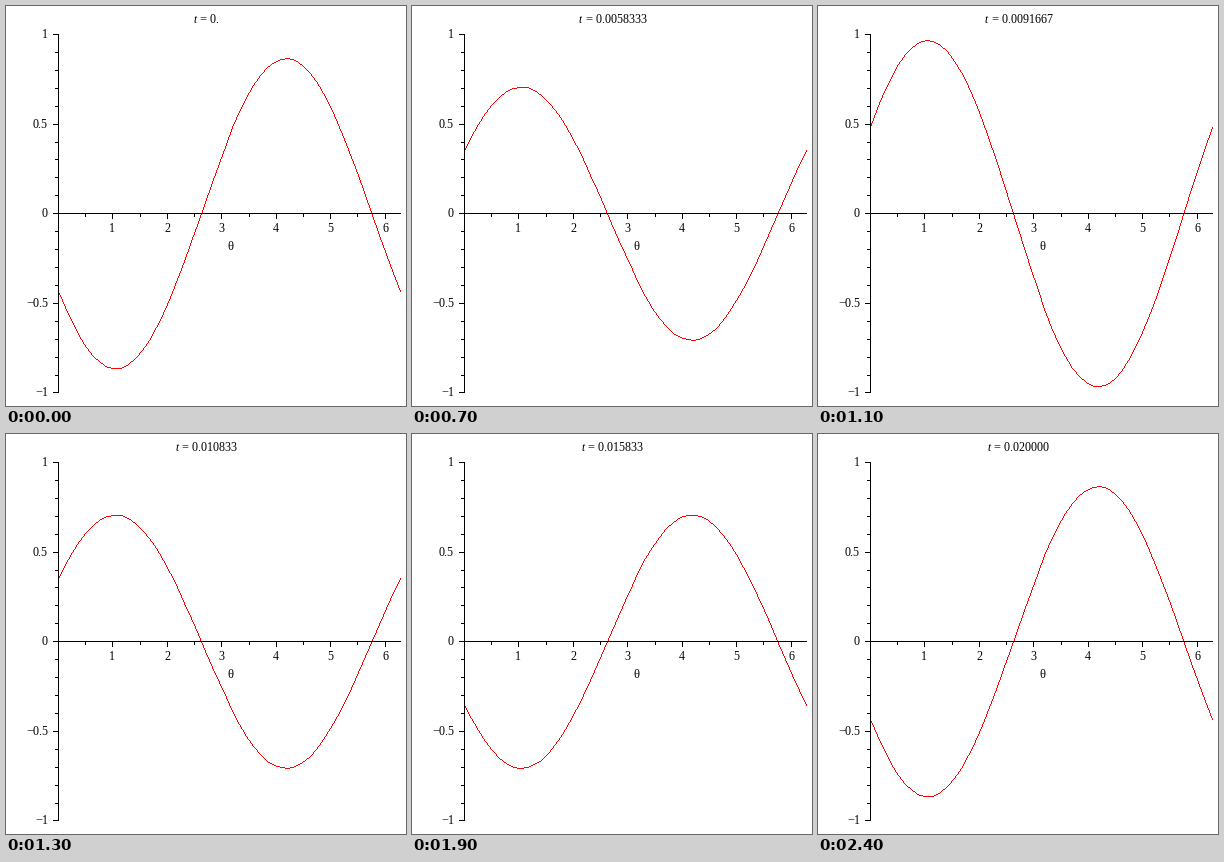
A matplotlib script for the animation above (2.5 s loop, 400 px wide and 400 px high).

```python
import numpy as np
import matplotlib.pyplot as plt
from matplotlib.animation import FuncAnimation
from matplotlib.collections import PolyCollection
from matplotlib.patches import Rectangle

plt.rcParams.update({
    "font.family": "Liberation Serif",
    "text.hinting": "native",
    "text.hinting_factor": 1,
})

DPI, SIZE = 100, 400
LEFT, MID, UNIT_Y = 52, 207.74, 179.2
UNIT_X = 342 / (2 * np.pi)
FRAMES, PERIOD = 25, 0.02

fig = plt.figure(figsize=(SIZE / DPI, SIZE / DPI), dpi=DPI, facecolor="white")
ax = fig.add_axes([0, 0, 1, 1])
ax.set(xlim=(0, SIZE), ylim=(SIZE, 0))
ax.axis("off")


def col(x):
    return np.floor(LEFT + 0.5 + UNIT_X * x)


def row(y):
    return np.floor(MID - UNIT_Y * y)


def box(x, y, w, h):
    ax.add_patch(Rectangle((x, y), w, h, fc="black", lw=0, aa=False,
                           snap=False, zorder=3))


def label(x, y, s, ha="center", **kw):
    return ax.text(x, y, s, ha=ha, va="baseline", fontsize=12 * 72 / DPI,
                   zorder=4, **kw)


def pixel_line(x, y):
    """Pixels of a one pixel wide line through whole-numbered points."""
    parts = []
    for x0, y0, x1, y1 in zip(x, y, x[1:], y[1:]):
        n = int(max(abs(x1 - x0), abs(y1 - y0)))
        parts.append(np.linspace((x0, y0), (x1, y1), n + 1))
    return np.unique(np.floor(np.concatenate(parts) + 0.5), axis=0)


# Axes with ticks and labels
box(LEFT, 28, 1, 359)
box(LEFT, row(0), 343, 1)

for i in range(-10, 11):
    y = row(i / 10)
    size = 3 if i % 5 else 5
    box(LEFT - size, y, size, 1)
    if i % 5 == 0:
        label(42, y + 4, f"{i / 10:g}".replace("-", "\u2212"), ha="right")

for i in range(1, 13):
    x = col(i / 2)
    size = 3 if i % 2 else 5
    box(x, row(0) + 1, 1, size)
    if i % 2 == 0:
        label(x, 226, str(i // 2))

label(224.5, 244, "\u03b8")

# Moving parts
theta = np.linspace(0, 2 * np.pi, 50)
wave = np.sin(theta + np.pi / 6)
cell = np.array([(0, 0), (1, 0), (1, 1), (0, 1)])
curve = ax.add_collection(PolyCollection(
    [], facecolors="red", linewidths=0, antialiaseds=False, snap=False,
    zorder=2), autolim=False)
name = label(0, 17, "t", ha="left", style="italic")
value = label(0, 17, "", ha="left")


def update(k):
    amp = np.sin(2 * np.pi * k / (FRAMES - 1) - np.pi / 3)
    pixels = pixel_line(col(theta), row(amp * wave))
    curve.set_verts(pixels[:, None] + cell)

    number = f"{PERIOD * k / (FRAMES - 1):#.5g}" if k else "0."
    left = 200.5 - (14 + 6 * len(number)) / 2
    name.set_x(left)
    value.set_x(left + 7)
    value.set_text("= " + number)
    return curve, name, value


anim = FuncAnimation(fig, update, frames=FRAMES, interval=100, repeat=True)
plt.show()
```
